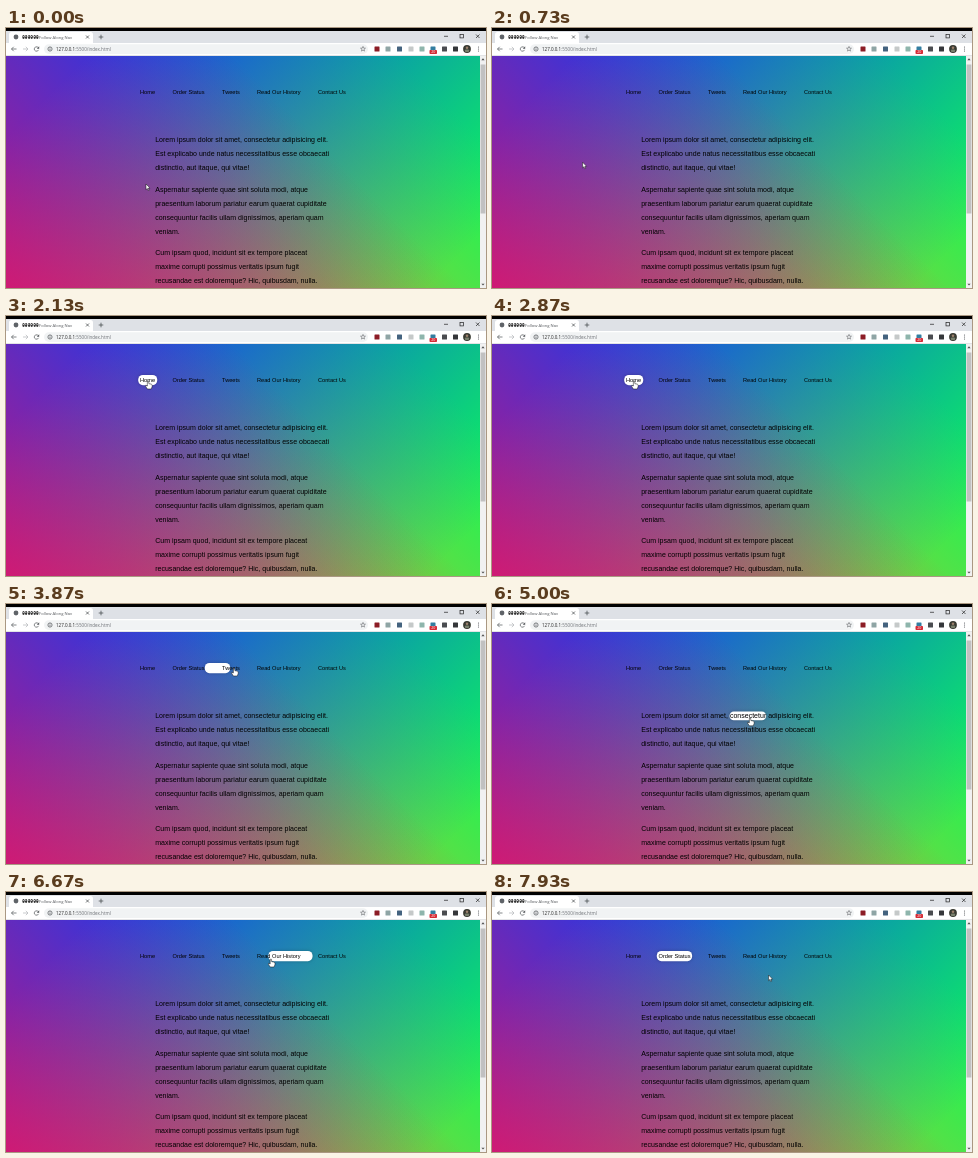
Recreate the animation shown at these times as an HTML page with a canvas. Size 480 by 260 pixels, loop 8000 ms.

```html
<!DOCTYPE html>
<html lang="en">
<head>
<meta charset="utf-8">
<title>Follow Along Nav</title>
<style>
  html, body { margin: 0; width: 100%; height: 100%; overflow: hidden; }
  canvas { display: block; width: 480px; height: 260px; }
</style>
</head>
<body>
<canvas id="stage"></canvas>
<script>
const W = 480, H = 260, LOOP = 8000;
const canvas = document.getElementById('stage');
const ctx = canvas.getContext('2d');
const dpr = window.devicePixelRatio || 1;
canvas.width = W * dpr;
canvas.height = H * dpr;

const PAGE = { x: 0, y: 28, w: 474, h: 344 };
const SANS = '"Liberation Sans", Arial, sans-serif';
const UI = '"Open Sans", sans-serif';

const navItems = [
  ['Home', 134], ['Order Status', 166.5], ['Tweets', 216],
  ['Read Our History', 251], ['Contact Us', 312]
];
const paragraphs = [
  ['Lorem ipsum dolor sit amet, consectetur adipisicing elit.',
   'Est explicabo unde natus necessitatibus esse obcaecati',
   'distinctio, aut itaque, qui vitae!'],
  ['Aspernatur sapiente quae sint soluta modi, atque',
   'praesentium laborum pariatur earum quaerat cupiditate',
   'consequuntur facilis ullam dignissimos, aperiam quam',
   'veniam.'],
  ['Cum ipsam quod, incidunt sit ex tempore placeat',
   'maxime corrupti possimus veritatis ipsum fugit',
   'recusandae est doloremque? Hic, quibusdam, nulla.']
];

const links = {
  home: [132.2, 59, 19, 10.2],
  order: [164.8, 59, 35.3, 10.2],
  tweets: [214.2, 59, 21.8, 10.2],
  history: [249.2, 59, 47.6, 10.2],
  contact: [310.2, 59, 31.8, 10.2],
  word: [237.5, 107.6, 36.7, 8.6]
};

// When the pointer enters each link
const hovers = [
  [1606, 'home'], [3440, 'order'], [3705, 'tweets'], [4540, 'word'],
  [5850, 'contact'], [6478, 'history'], [6850, 'tweets'], [7030, 'order']
];
const GLIDE = 400;

// Pointer path: time, x, y
const path = [
  [0, 140, 156], [70, 139, 155.5], [870, 82, 131], [1150, 72, 128], [1470, 73, 127],
  [1606, 132.5, 69], [1750, 142, 65], [3080, 142, 65], [3440, 166, 64],
  [3705, 216, 64], [3870, 228, 64], [4100, 232, 66], [4540, 254, 108],
  [4800, 258, 113.5], [5200, 258, 114], [5650, 304, 85], [5850, 316, 69],
  [6050, 320, 65], [6330, 298.5, 66], [6470, 298.5, 66], [6670, 265, 67],
  [6850, 235.5, 67], [7030, 199.5, 66], [7200, 187, 66], [7360, 191, 75],
  [7930, 276.5, 83], [8000, 280, 83]
];

// CSS "ease": cubic-bezier(.25, .1, .25, 1)
function ease(x) {
  if (x <= 0) return 0;
  if (x >= 1) return 1;
  const bez = (u, a, b) => 3 * u * (1 - u) * (1 - u) * a + 3 * u * u * (1 - u) * b + u * u * u;
  let lo = 0, hi = 1;
  for (let i = 0; i < 24; i++) {
    const mid = (lo + hi) / 2;
    if (bez(mid, 0.25, 0.25) < x) lo = mid; else hi = mid;
  }
  return bez(lo, 0.1, 1);
}

function highlightAt(t, last = hovers.length - 1) {
  while (last >= 0 && hovers[last][0] > t) last--;
  if (last < 0) return [0, 28, 0, 0];
  const [start, name] = hovers[last];
  const from = highlightAt(start, last - 1);
  const p = ease((t - start) / GLIDE);
  return links[name].map((v, i) => from[i] + (v - from[i]) * p);
}

// Smooth monotone interpolation along the path
function pointerAt(t) {
  let i = 0;
  while (i < path.length - 2 && path[i + 1][0] <= t) i++;
  const dt = path[i + 1][0] - path[i][0];
  const u = (t - path[i][0]) / dt;
  const rate = (j, k) => j < 0 || j > path.length - 2 ? 0 :
    (path[j + 1][k] - path[j][k]) / (path[j + 1][0] - path[j][0]);
  const slope = (j, k) => {
    const a = rate(j - 1, k), b = rate(j, k);
    return a * b > 0 ? 2 * a * b / (a + b) : 0;
  };
  return [1, 2].map(k => {
    const a = path[i][k], b = path[i + 1][k];
    const s = u * u * (3 - 2 * u);
    return a + (b - a) * s + dt * (u * (1 - u) * (1 - u) * slope(i, k) - u * u * (1 - u) * slope(i + 1, k));
  });
}

function rect(x, y, w, h, color) {
  ctx.fillStyle = color;
  ctx.fillRect(x, y, w, h);
}

function pill(x, y, w, h, r, color) {
  ctx.fillStyle = color;
  ctx.beginPath();
  ctx.roundRect(x, y, w, h, r);
  ctx.fill();
}

function disc(x, y, r, color) {
  ctx.fillStyle = color;
  ctx.beginPath();
  ctx.arc(x, y, r, 0, Math.PI * 2);
  ctx.fill();
}

function line(points, color, width = 0.7) {
  ctx.strokeStyle = color;
  ctx.lineWidth = width;
  ctx.beginPath();
  points.forEach(([x, y]) => ctx.lineTo(x, y));
  ctx.stroke();
}

function ring(x, y, r, color, start = 0, end = Math.PI * 2) {
  ctx.strokeStyle = color;
  ctx.lineWidth = 0.7;
  ctx.beginPath();
  ctx.arc(x, y, r, start, end);
  ctx.stroke();
}

function polygon(points, fill, stroke) {
  ctx.beginPath();
  points.forEach(([x, y]) => ctx.lineTo(x, y));
  ctx.closePath();
  ctx.fillStyle = fill;
  ctx.fill();
  if (stroke) {
    ctx.strokeStyle = stroke;
    ctx.lineWidth = 0.5;
    ctx.stroke();
  }
}

// Set large and scaled down, so letter spacing stays fractional
function text(str, x, y, size, color, family = SANS) {
  const k = 8;
  ctx.save();
  ctx.translate(x, y);
  ctx.scale(1 / k, 1 / k);
  ctx.font = `${size * k}px ${family}`;
  ctx.fillStyle = color;
  ctx.fillText(str, 0, 0);
  const width = ctx.measureText(str).width / k;
  ctx.restore();
  return width;
}

// Diagonal fade, (dx, dy) is the direction it runs in
function fade(dx, dy, rgb, from, to) {
  const cx = PAGE.x + PAGE.w / 2, cy = PAGE.y + PAGE.h / 2, d = (PAGE.w + PAGE.h) / 4;
  const g = ctx.createLinearGradient(cx - dx * d, cy - dy * d, cx + dx * d, cy + dy * d);
  g.addColorStop(from, `rgba(${rgb},1)`);
  g.addColorStop(to, `rgba(${rgb},0)`);
  rect(PAGE.x, PAGE.y, PAGE.w, PAGE.h, g);
}

function drawBackground() {
  rect(PAGE.x, PAGE.y, PAGE.w, PAGE.h, 'rgb(249,166,31)');
  fade(-1, 1, '14,250,88', 0.1, 0.8);
  fade(1, 1, '6,64,249', 0.1, 0.8);
  fade(1, -1, '240,10,98', 0, 0.7);
}

function drawHighlight(t) {
  const [x, y, w, h] = highlightAt(t);
  if (w < 0.1) return;
  ctx.save();
  ctx.shadowColor = 'rgba(0,0,0,.25)';
  ctx.shadowBlur = 3.5 * dpr;
  pill(x, y, w, h, Math.min(4.6, h / 2, w / 2), '#fff');
  ctx.restore();
}

function drawCopy() {
  navItems.forEach(([label, x]) => text(label, x, 66.1, 5.64, '#000'));
  let y = 114.3;
  for (const lines of paragraphs) {
    for (const str of lines) {
      text(str, 149.2, y, 7.03, '#000');
      y += 14.06;
    }
    y += 7.03;
  }
}

function drawTabs() {
  rect(0, 0, W, 28, '#fff');
  rect(0, 3, W, 12, '#dee1e6');
  rect(0, 0, W, 3, '#000');
  pill(3, 4, 84, 12, [2.5, 2.5, 0, 0], '#fff');
  disc(10, 9, 2.4, '#5f6368');
  for (let i = 0; i < 3; i++) {
    for (const dx of [0, 2.6]) {
      ctx.fillStyle = '#333';
      ctx.beginPath();
      ctx.ellipse(17.5 + i * 5.6 + dx, 9, 1.2, 1.9, 0, 0, Math.PI * 2);
      ctx.fill();
      disc(17.3 + i * 5.6 + dx, 8.6, 0.5, '#fff');
    }
  }
  text('Follow Along Nav', 33, 10.5, 4.15, '#55585c', UI);
  const dark = '#3c4043';
  line([[80, 7.5], [83, 10.5]], dark);
  line([[83, 7.5], [80, 10.5]], dark);
  line([[92.7, 9], [97.3, 9]], dark);
  line([[95, 6.7], [95, 11.3]], dark);
  line([[438, 8.3], [442, 8.3]], '#222');
  ctx.strokeRect(454, 6.5, 3.4, 3.4);
  line([[470, 6.5], [473.5, 10]], '#222');
  line([[473.5, 6.5], [470, 10]], '#222');
}

function drawToolbar() {
  const dark = '#505357', pale = '#b4b6b9';
  for (const [x, dir, color] of [[8, -1, dark], [19.5, 1, pale]]) {
    line([[x - 2.5, 21], [x + 2.5, 21]], color);
    line([[x + dir * 0.3, 18.8], [x + dir * 2.5, 21], [x + dir * 0.3, 23.2]], color);
  }
  ring(30.5, 21, 2.2, dark, 0.4, 5.6);
  polygon([[33.2, 18.3], [33.2, 20.8], [30.8, 20.8]], dark);
  pill(38, 16.3, 324, 9.6, 4.8, '#f1f3f4');
  ring(44, 21, 2.1, dark);
  rect(43.65, 20.6, 0.7, 1.6, dark);
  rect(43.65, 19.5, 0.7, 0.7, dark);
  const host = text('127.0.0.1', 50, 22.7, 4.53, '#222', UI);
  text(':5500/index.html', 50 + host, 22.7, 4.53, '#6c7075', UI);

  const star = Array.from({ length: 10 }, (_, i) => {
    const a = i * Math.PI / 5 - Math.PI / 2, r = i % 2 ? 1.1 : 2.6;
    return [357 + r * Math.cos(a), 21 + r * Math.sin(a)];
  });
  polygon(star, '#f1f3f4', dark);

  const marks = [[371, '#8c1d26'], [382, '#8fa5a5'], [393.5, '#44637f'], [405, '#c5c9c9'],
    [416, '#8eb5ac'], [427, '#327da0'], [438.5, '#4a4c50'], [449.5, '#35373a']];
  for (const [x, color] of marks) pill(x - 2.5, 18.5, 5, 5, 0.5, color);
  pill(423.5, 22, 7.5, 4, 0.8, '#d52b36');
  text('20', 425.2, 25.3, 3.6, '#fff', UI);

  disc(461, 21, 3.9, '#393a32');
  disc(461, 19.8, 1.3, '#9a806c');
  pill(458.8, 21.4, 4.4, 2.5, 1.2, '#78806d');
  for (const y of [19, 21, 23]) disc(472.5, y, 0.55, dark);
  rect(0, 27, W, 1, '#e3e4e6');
}

function drawScrollbar() {
  rect(474, 28, 6, 232, '#f1f1f1');
  rect(474.6, 36.5, 4.8, 149, '#c1c1c1');
  polygon([[477, 30.3], [478.6, 32.2], [475.4, 32.2]], '#505050');
  polygon([[477, 257.6], [478.6, 255.7], [475.4, 255.7]], '#505050');
}

function drawPointer(t) {
  const [x, y] = pointerAt(t);
  const over = Object.values(links).some(([lx, ly, w, h]) =>
    x >= lx && x <= lx + w && y >= ly && y <= ly + h);
  ctx.save();
  ctx.translate(x, y);
  ctx.lineJoin = 'round';
  if (over) {
    polygon([[-0.6, 0.2], [0.6, 0.2], [0.9, 2.7], [3.2, 3.1], [4.2, 3.9], [4.1, 5.8],
      [3.2, 8], [-0.6, 8], [-2.5, 5.2], [-2.3, 4.3], [-0.7, 5]], '#fff', '#111');
  } else {
    polygon([[0, 0], [0, 5.7], [1.3, 4.5], [2.2, 6.6], [3.1, 6.2], [2.2, 4.2], [4, 4.1]], '#fff', '#111');
  }
  ctx.restore();
}

function draw(t) {
  ctx.setTransform(dpr, 0, 0, dpr, 0, 0);
  drawBackground();
  drawHighlight(t);
  drawCopy();
  drawTabs();
  drawToolbar();
  drawScrollbar();
  drawPointer(t);
}

const began = performance.now();
function tick() {
  draw((performance.now() - began) % LOOP);
  requestAnimationFrame(tick);
}
tick();
</script>
</body>
</html>
```
